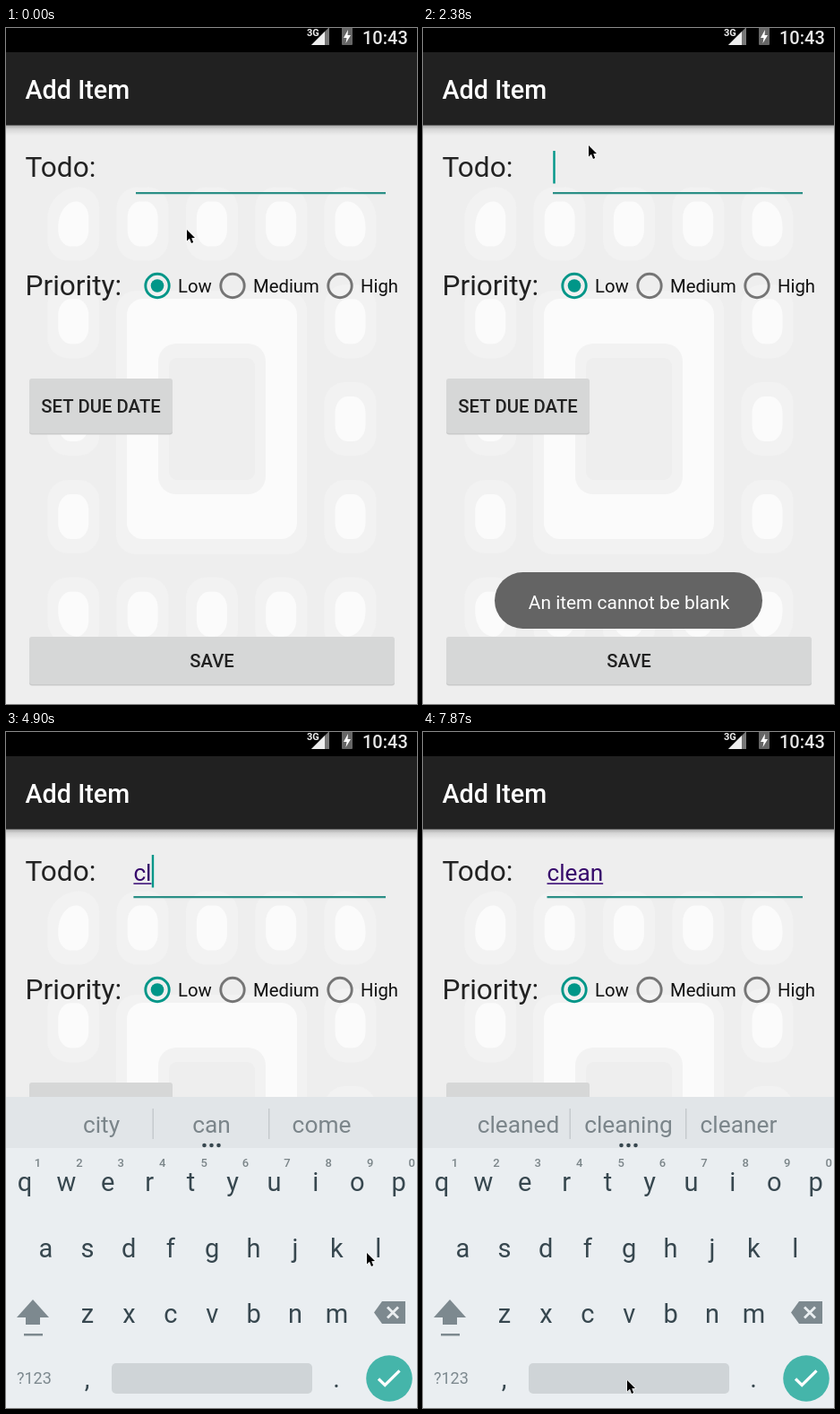
These frames come from a looping animation (459x754 px, 8000 ms). An HTML page with a canvas:

```html
<!DOCTYPE html>
<html lang="en">
<head>
<meta charset="utf-8">
<title>Add Item</title>
<style>
html, body { margin: 0; width: 100%; height: 100%; overflow: hidden; background: #eee; }
canvas { display: block; }
</style>
</head>
<body>
<canvas id="stage" width="459" height="754"></canvas>
<script>
const ctx = document.getElementById('stage').getContext('2d');
const LOOP = 8000, STEP = 148.5, DWELL = 120, PITCH = 46.4;
const TEAL = '#009688', KEY = '#37474f', KEY_SOFT = '#7d898f', KEYBOARD = '#eaeef1';

// Where the pointer rests, and what it types there
const stops = [
  { time: 145, x: 202, y: 225 },
  { time: 450, x: 212, y: 212 },
  { time: 1130, x: 155, y: 706 },
  { time: 1760, x: 155, y: 706 },
  { time: 2075, x: 199, y: 90 },
  { time: 2375, x: 185, y: 131 },
  { time: 4150, x: 176, y: 630, key: 'c', words: 'city can come' },
  { time: 4790, x: 403, y: 581, key: 'l', words: 'class Cl clean' },
  { time: 5400, x: 114, y: 502, key: 'e', words: 'clear Cle clean' },
  { time: 6080, x: 44, y: 568, key: 'a', words: 'clear Clea clearly' },
  { time: 7270, x: 323, y: 639, key: 'n', words: 'cleaned cleaning cleaner' },
  { time: 7980, x: 228, y: 723 }
];
const typedBy = t => stops.filter(s => s.key && s.time <= t);

const clamp = v => Math.max(0, Math.min(1, v));
const easeOut = v => 1 - (1 - clamp(v)) ** 3;

function rect(x, y, w, h, color, radius = 0) {
  ctx.fillStyle = color;
  ctx.beginPath();
  ctx.roundRect(x, y, w, h, radius);
  ctx.fill();
}

function circle(x, y, r, color) {
  ctx.fillStyle = color;
  ctx.beginPath();
  ctx.arc(x, y, r, 0, 7);
  ctx.fill();
}

function poly(points, color) {
  ctx.fillStyle = color;
  ctx.beginPath();
  points.forEach(p => ctx.lineTo(...p));
  ctx.closePath();
  ctx.fill();
}

function stroke(points, color, width) {
  ctx.strokeStyle = color;
  ctx.lineWidth = width;
  ctx.beginPath();
  points.forEach(p => ctx.lineTo(...p));
  ctx.stroke();
}

function text(str, x, y, size, color, weight = 400, align = 'left') {
  ctx.font = `${weight} ${size}px Roboto, sans-serif`;
  ctx.textAlign = align;
  ctx.fillStyle = color;
  ctx.fillText(str, x, y);
}

// Rest around each stop, then glide to the next one
function pointerAt(t) {
  const i = Math.max(1, stops.findIndex(s => s.time > t));
  const from = stops[i - 1], to = stops[i];
  const start = from.time + DWELL, end = to.time - DWELL;
  const f = easeOut((t - start) / (end - start));
  return [from.x + (to.x - from.x) * f, from.y + (to.y - from.y) * f];
}

function drawBackdrop() {
  rect(0, 0, 459, 754, '#eee');
  const halo = '#f2f2f2', core = '#fbfbfb';
  for (let row = 0; row < 5; row++) {
    for (let col = 0; col < 5; col++) {
      if (row % 4 && col % 4) continue;
      const x = 75.3 + col * 77.3, y = 218.5 + row * 108.8;
      const outer = Array(4).fill(23), inner = Array(4).fill({ x: 14, y: 18 });
      if (row % 4 === 0 && col % 4 === 0) {
        const corner = row ? (col ? 2 : 3) : (col ? 1 : 0);
        outer[corner] = 35;
        inner[corner] = { x: 20, y: 28 };
      }
      rect(x - 29, y - 41, 58, 82, halo, outer);
      rect(x - 17, y - 25, 34, 50, core, inner);
    }
  }
  rect(123, 293, 213, 294, halo, 22);
  rect(135, 302, 190, 268, core, 18);
  rect(170, 352, 120, 168, halo, 20);
  rect(182, 368, 96, 136, '#eee', 9);
}

function drawBars() {
  const shade = ctx.createLinearGradient(0, 108, 0, 120);
  shade.addColorStop(0, 'rgba(0,0,0,.32)');
  shade.addColorStop(.4, 'rgba(0,0,0,.1)');
  shade.addColorStop(1, 'rgba(0,0,0,0)');
  rect(0, 108, 459, 12, shade);
  rect(0, 27, 459, 81.5, '#212121');
  rect(0, 0, 459, 27, '#000');
  text('Add Item', 21.5, 78.5, 28.7, '#fff', 500);

  poly([[341, 19], [361, 19], [361, -1]], '#777');
  poly([[341, 19], [356, 19], [356, 4]], '#eee');
  text('3G', 336, 9, 11, '#eee', 700);
  rect(375, -2, 12, 21, '#666', 1);
  poly([[382, 2], [377, 11], [380.5, 11], [379.5, 17], [385, 8], [381.5, 8]], '#fff');
  text('10:43', 398, 17.5, 20, '#e8e8e8', 500);
}

function drawButton(label, x, y, w, h, color) {
  rect(x, y + 1.5, w, h, '#c9caca', 3);
  rect(x, y, w, h, color, 3);
  text(label, x + w / 2, y + h / 2 + 7.5, 20.3, '#212121', 500, 'center');
}

function drawRadio(label, x, checked) {
  const color = checked ? TEAL : '#757575';
  ctx.strokeStyle = color;
  ctx.lineWidth = 2.9;
  ctx.beginPath();
  ctx.arc(x, 287.5, 13.2, 0, 7);
  ctx.stroke();
  if (checked) circle(x, 287.5, 7.3, color);
  text(label, x + 23, 295, 20.3, '#111');
}

function drawForm(t) {
  text('Todo:', 21.5, 165.5, 31.6, '#222');
  text('Priority:', 21.5, 298, 31.6, '#222');
  drawRadio('Low', 169, true);
  drawRadio('Medium', 253);
  drawRadio('High', 373);
  drawButton('SET DUE DATE', 26, 391, 160, 61, '#d6d7d7');
  const pressed = t > 1150 && t < 1600;
  drawButton('SAVE', 26, 679, 408, 53, pressed ? '#c3c3c3' : '#d6d7d7');

  // The field widens a little with every letter
  const typed = typedBy(t);
  const value = typed.map(s => s.key).join('');
  const left = 145 - 1.3 * value.length;
  rect(left, 183, 424 - left, 2.2, '#2b8f86');
  text(value, left, 165.5, 26.2, '#36096b');
  const width = ctx.measureText(value).width;
  rect(left, 168.3, width, 1.7, '#4a2080');
  const blinkStart = typed.at(-1)?.time ?? 140;
  if ((t - blinkStart + LOOP) % 1000 < 500) rect(left + width + .3, 137, 2.4, 36.5, TEAL);
}

function drawKeys(keys, x, y, size = 29, color = KEY, weight = 400) {
  [...keys].forEach((key, i) => text(key, x + i * PITCH, y, size, color, weight, 'center'));
}

function drawKeyboard(t) {
  const hidden = (1 - clamp((t - 2600) / 300)) ** 2;
  if (hidden === 1) return;
  ctx.save();
  ctx.translate(0, 347 * hidden);
  rect(0, 407, 459, 347, KEYBOARD);
  rect(0, 407, 459, 57, '#e1e5e8');
  for (const x of [163.5, 293]) rect(x, 420, 1.4, 34, '#c3c8cb');

  // Suggestions trail the typed text slightly
  const words = typedBy(t - 200).at(-1)?.words.split(' ') ?? [];
  words.forEach((word, i) => {
    text(word, 106.5 + i * 123, 447, 26.3, '#7b858a', 400, 'center');
    circle(221.5 + i * 8, 461, 2.3, KEY);
  });

  drawKeys('1234567890', 35.5, 485, 13, '#7b8589', 500);
  drawKeys('qwertyuiop', 21, 512);
  drawKeys('asdfghjkl', 44.5, 585.5);
  drawKeys('zxcvbnm', 91, 658.5);

  poly([[30, 633], [48, 653], [12, 653]], KEY_SOFT);
  rect(22, 652, 16, 9, KEY_SOFT);
  rect(20, 671, 21, 2.5, KEY_SOFT);
  poly([[411, 647.5], [420, 635], [446, 635], [446, 660], [420, 660]], KEY_SOFT);
  for (const d of [-6, 6]) stroke([[432 - d, 641.5], [432 + d, 653.5]], KEYBOARD, 2.8);

  text('?123', 12, 727, 18, KEY_SOFT);
  text(',', 90.5, 731, 29, KEY, 400, 'center');
  text('.', 369, 731, 29, KEY, 400, 'center');
  rect(118, 704, 224, 34, '#cfd4d7', 5);
  circle(428, 721, 25.8, '#45b5aa');
  stroke([[416, 721.5], [423.2, 728.5], [439.5, 712.3]], '#fff', 3.2);
  ctx.restore();
}

function drawToast(t) {
  const alpha = Math.min(clamp((t - 1264) / 145), clamp((3520 - t) / 150));
  ctx.globalAlpha = alpha;
  rect(80, 607, 299, 63, '#646464', 31.5);
  ctx.globalAlpha = easeOut(alpha);
  text('An item cannot be blank', 230, 648, 20.9, '#fff', 400, 'center');
  ctx.globalAlpha = 1;
}

function drawPointer(t) {
  const [x, y] = pointerAt(t);
  const shape = [[0, 0], [0, 12.5], [3, 9.8], [5, 15], [7.2, 14], [5.2, 9.2], [9, 9]]
    .map(([dx, dy]) => [x + dx, y + dy]);
  stroke([...shape, shape[0]], 'rgba(255,255,255,.8)', 1.4);
  poly(shape, '#000');
}

function draw() {
  const now = performance.now() % LOOP;
  const t = Math.floor(now / STEP + .03) * STEP;
  drawBackdrop();
  drawBars();
  drawForm(t);
  drawKeyboard(t);
  drawToast(t);
  drawPointer(t);
  requestAnimationFrame(draw);
}
draw();
</script>
</body>
</html>
```
